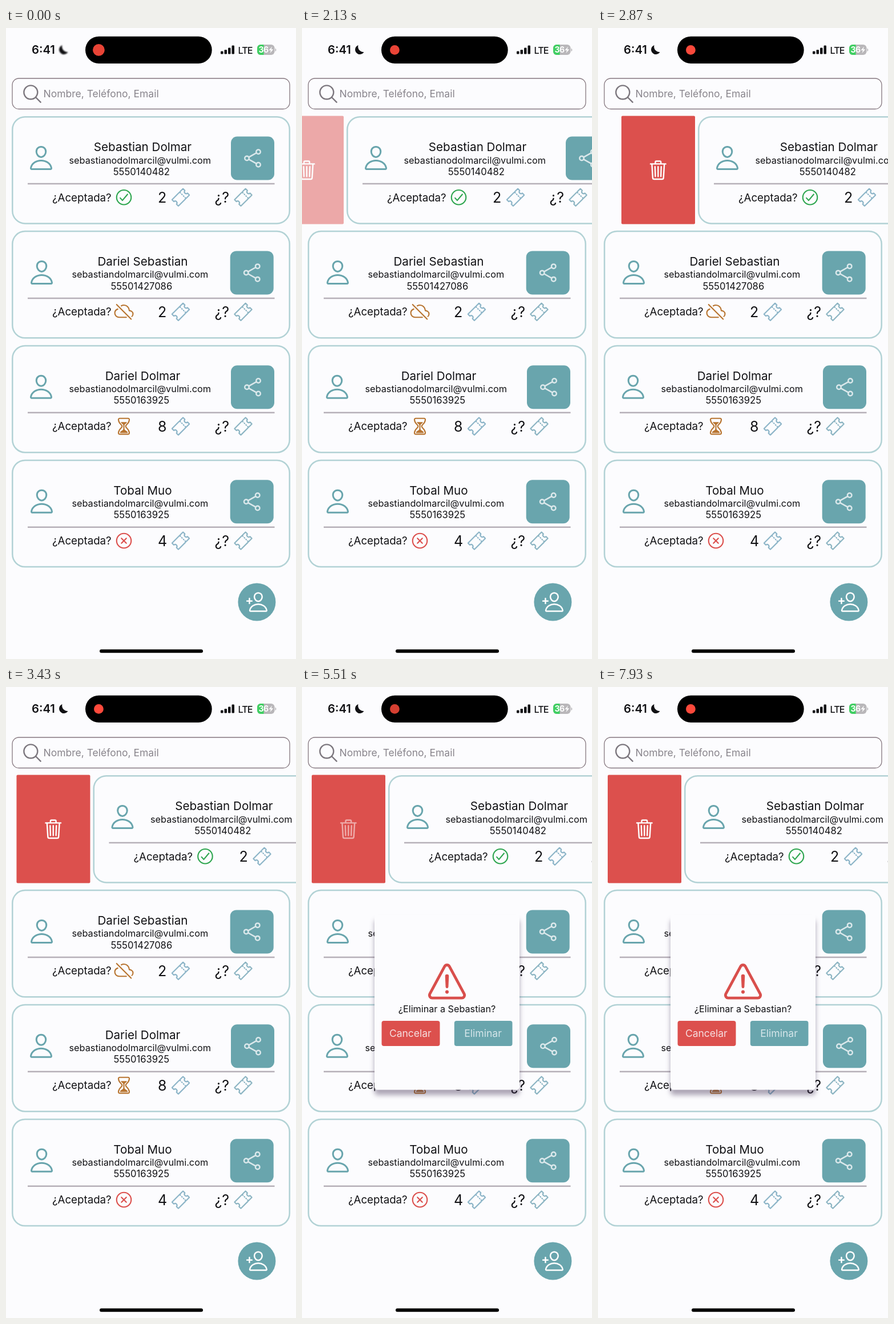
Write an HTML page that moves like this. It is 508 px wide and 1102 px high and loops after 8 s.

```html
<!DOCTYPE html>
<html lang="es">
<head>
<meta charset="utf-8">
<title>Invitados</title>
<style>
  html, body { margin: 0; width: 100%; height: 100%; overflow: hidden; background: #fcfcfe; }
  svg { display: block; width: 100%; height: 100%; }
  text { font-family: Inter, "Noto Sans", sans-serif; fill: #111114; }
  .icon { fill: none; stroke: currentColor; stroke-width: 32; stroke-linecap: round; stroke-linejoin: round; }
  .icon .solid { fill: currentColor; stroke: none; }
  #dialog > rect:first-child { filter: drop-shadow(0 9px 4px rgba(62, 45, 80, .42)); }
</style>
</head>
<body>
<svg id="stage" viewBox="0 0 508 1102"></svg>
<script>
const LOOP = 8000;
const TEAL = '#69a5ad', RED = '#dc504d', AMBER = '#b87531', GREEN = '#2fa650', PAPER = '#fcfcfe';

// Icon outlines on a 512 unit grid
const path = (d, cls = '') => `<path class="${cls}" d="${d}"/>`;
const ring = (x, y, r) => `<circle cx="${x}" cy="${y}" r="${r}"/>`;
const person = path('M344 144c-3.92 52.87-44 96-88 96s-84.15-43.12-88-96c-4-55 35-96 88-96s92 42 88 96z' +
  'M256 304c-87 0-175.3 48-191.64 138.6C62.39 453.52 68.57 464 80 464h352c11.44 0 17.62-10.48 15.65-21.4C431.3 352 343 304 256 304z');
const icons = {
  person,
  addPerson: `<g transform="translate(32)">${person}</g>` + path('M88 176v112M144 232H32'),
  search: ring(221, 221, 157) + path('M338 338L448 448'),
  share: ring(128, 256, 48) + ring(384, 112, 48) + ring(384, 400, 48) +
    path('M169.8 279.5l172.4 97M342.2 135.5l-172.4 97'),
  check: ring(256, 256, 192) + path('M352 176L217.6 336 160 272'),
  cross: ring(256, 256, 192) + path('M320 320L192 192M192 320l128-128'),
  offline: path('M448 448L64 64M93.7 183.3C49.5 198 16 233 16 288c0 66 54 112 120 112h184.4' +
    'M467.8 377.2C485.2 363.4 496 341.6 496 312c0-59.8-53-85.8-96-88-8.9-89.5-71-144-144-144-26.2 0-48.8 6.9-67.6 18.1'),
  hourglass: path('M145.6 464h220.8c19.8 0 35.5-16.3 33.4-35C386 308 304 310 304 256s83-51 95.8-173c2-18.7-13.6-35-33.4-35H145.6' +
    'c-19.8 0-35.4 16.3-33.4 35C125 205 208 201 208 256s-82 52-95.8 173c-2.1 18.7 13.6 35 33.4 35z') +
    path('M343 432H169c-15.6 0-20-18-9-29 26.5-27 80-46 80-77V224c0-20-38-35-61.5-67-4-5.5-3.5-13 6.5-13h142.6' +
    'c8.4 0 10.2 7.5 6.4 13C311 189 272 204 272 224v102c0 30.5 55.7 47 80.4 77 10 12 6.5 29-9.4 29z', 'solid'),
  ticket: path('M366 146a46.7 46.7 0 01-2.4-63.4 4 4 0 00-.2-5.3l-44.1-44.2a4 4 0 00-5.5 0l-70.3 70.4a23.6 23.6 0 00-5.7 9.2' +
    ' 23.7 23.7 0 01-15 15 23.7 23.7 0 00-9.2 5.7L33 313.8a4 4 0 000 5.5l44.1 44.1a4 4 0 005.3.2 46.7 46.7 0 0165.9 65.9' +
    ' 4 4 0 00.2 5.3l44.1 44.1a4 4 0 005.5 0l180.4-180.4a23.7 23.7 0 005.7-9.2 23.7 23.7 0 0115-15 23.6 23.6 0 009.2-5.7' +
    'l70.4-70.4a4 4 0 000-5.5l-44.1-44.1a4 4 0 00-5.3-.2A46.7 46.7 0 01366 146z') +
    path('M250.5 140.4l-16.5-16.5M294.5 184.5l-11-11M338.5 228.5l-11-11M388 278l-16.5-16.5'),
  trash: path('M112 112l20 320c1 18.5 14.4 32 32 32h184c17.7 0 30.9-13.5 32-32l20-320M80 112h352' +
    'M192 112V72a24 24 0 0124-24h80a24 24 0 0124 24v40M256 176v224M184 176l8 224M328 176l-8 224'),
  warning: path('M85.6 446h340.8a32 32 0 0028.2-47L284.2 82.6c-12-22.4-44.3-22.4-56.4 0L57.4 399a32 32 0 0028.2 47z' +
    'M250.3 195.4l5.7 122 5.7-122a5.7 5.7 0 00-11.4 0z') + `<circle class="solid" cx="256" cy="377" r="20"/>`
};

const icon = (name, x, y, size, color) =>
  `<g class="icon" color="${color}" transform="translate(${x} ${y}) scale(${size / 512}) translate(-256 -256)">${icons[name]}</g>`;
const text = (s, x, y, size, attrs = '') => `<text x="${x}" y="${y}" font-size="${size}" ${attrs}>${s}</text>`;
const centered = (s, x, y, size, attrs = '') => text(s, x, y, size, `text-anchor="middle" ${attrs}`);
const box = (x, y, w, h, r, attrs) => `<rect x="${x}" y="${y}" width="${w}" height="${h}" rx="${r}" ${attrs}/>`;

const guests = [
  { name: 'Sebastian Dolmar', email: 'sebastianodolmarcil@vulmi.com', phone: '5550140482', tickets: 2, status: 'check', color: GREEN },
  { name: 'Dariel Sebastian', email: 'sebastiandolmarcil@vulmi.com', phone: '55501427086', tickets: 2, status: 'offline', color: AMBER },
  { name: 'Dariel Dolmar', email: 'sebastianodolmarcil@vulmi.com', phone: '5550163925', tickets: 8, status: 'hourglass', color: AMBER },
  { name: 'Tobal Muo', email: 'sebastiandolmarcil@vulmi.com', phone: '5550163925', tickets: 4, status: 'cross', color: RED }
];

// Card content relative to the top of its row
function card(guest, row) {
  const nudge = row % 2;
  return `<g transform="translate(0 ${154 + row * 199.9})"><g id="card${row}">
    ${box(11.3, 1.2, 485.4, 186.2, 22, `fill="${PAPER}" stroke="#b2d2d5" stroke-width="2.5"`)}
    ${icon('person', 61.5 + nudge, 73, 48, TEAL)}
    ${centered(guest.name, 239.5, 61.3, 20.6)}
    ${centered(guest.email, 234.8, 82.5, 16.3)}
    ${centered(guest.phone, 237.3, 102.7, 16.6)}
    ${box(394 - nudge * 1.3, 35.5, 76, 76, 11, `fill="${TEAL}"`)}
    ${icon('share', 432 - nudge * 1.3, 73.5, 40, '#dbe8eb')}
    <path d="M38 118H470.5" stroke="#b6b0b8" stroke-width="2.5"/>
    ${text('¿Aceptada?', 81, 148.5, 18.7)}
    ${icon(guest.status, 206.5, 141.8, 34, guest.color)}
    ${text(guest.tickets, 266, 151, 25)}
    ${icon('ticket', 306, 141.8, 34.5, '#8db5c8')}
    ${text('¿?', 365.5, 151, 25)}
    ${icon('ticket', 415.5, 141.8, 34.5, '#8db5c3')}
  </g></g>`;
}

const statusBar = `
  ${text('6:41', 45, 45.2, 20.3, 'font-weight="600"')}
  <path id="moon" d="M98.5 30A8.3 8.3 0 1 0 108.5 42A9.5 9.5 0 0 1 98.5 30Z" fill="#111114"/>
  ${box(139, 14.7, 221.7, 47.3, 23.6, 'fill="#000"')}
  <circle id="recording" cx="162.4" cy="38.4"/>
  ${[5, 7.5, 11, 15].map((h, i) => box(376 + i * 6.5, 45.5 - h, 4.5, h, 1.2, 'fill="#111114"')).join('')}
  ${text('LTE', 406.5, 44.5, 16.2, 'font-weight="500" letter-spacing="-1"')}
  <clipPath id="cell">${box(440, 29, 30.5, 18, 6, '')}</clipPath>
  <g clip-path="url(#cell)">${box(440, 29, 31, 18, 0, 'fill="#b9b7ba"')}${box(440, 29, 11.5, 18, 0, 'fill="#40cf62"')}</g>
  <path d="M471.5 35.5a3 3 0 0 1 0 5.5z" fill="#b9b7ba"/>
  ${text('36', 442.5, 43.2, 14, 'font-weight="700" letter-spacing="-.6" style="fill:#fff"')}
  <path d="M466 32.5l-5.5 6.5h3.5l-1.5 5 5.7-6.7h-3.6z" fill="#fff"/>`;

const searchBox = `
  ${box(11, 88, 486, 53.5, 11.5, 'fill="none" stroke="#85777f" stroke-width="1.3"')}
  ${icon('search', 46, 115, 39, '#7c777e')}
  ${text('Nombre, Teléfono, Email', 65.5, 121.2, 17.5, 'style="fill:#88848b"')}`;

const deleteAction = `<g id="delete">
  ${box(-124, 153.5, 129, 189, 2, `fill="${RED}"`)}
  <g id="trash">${icon('trash', -59.7, 248.3, 38.8, '#fff')}</g></g>`;

const dialog = `<g id="dialog">
  ${box(127, 398, 254, 305.5, 5, `fill="${PAPER}"`)}
  ${icon('warning', 254, 514.3, 77.5, '#d94f4c')}
  ${centered('¿Eliminar a Sebastian?', 254, 568, 16.2)}
  ${box(139.5, 583, 102, 44, 4, `fill="${RED}"`)}
  ${centered('Cancelar', 189.8, 611, 17.5, 'style="fill:#f6dfe0"')}
  ${box(266.8, 583, 101.7, 44, 4, `fill="${TEAL}"`)}
  ${centered('Eliminar', 317, 611, 17.6, 'style="fill:#d6e6ea"')}</g>`;

document.getElementById('stage').innerHTML = statusBar + searchBox + deleteAction +
  guests.map(card).join('') + `
  <circle cx="439.4" cy="1002.5" r="33" fill="${TEAL}"/>
  ${icon('addPerson', 439.4, 1002.5, 39.5, '#fff')}
  ${box(164, 1085.2, 181, 6, 3, 'fill="#000"')}` + dialog;

const $ = id => document.getElementById(id);
const progress = (t, start, end) => Math.min(1, Math.max(0, (t - start) / (end - start)));
const REST = 141, PULLED = 165, RELEASE = 3150, OPEN = 5410;

function swipeOffset(t) {
  if (t < RELEASE) return PULLED * Math.sin(progress(t, 1857, 2870) * Math.PI / 2);
  return REST + (PULLED - REST) * Math.exp((RELEASE - t) / 100);
}

function render(t) {
  const x = swipeOffset(t);
  $('card0').setAttribute('transform', `translate(${x})`);
  $('delete').setAttribute('transform', `translate(${x})`);
  $('delete').setAttribute('opacity', Math.min(1, x / REST));

  const pressed = progress(t, 5210, 5360) - progress(t, OPEN, OPEN + 250);
  $('trash').setAttribute('opacity', 1 - 0.8 * pressed);
  $('dialog').setAttribute('visibility', t >= OPEN ? 'visible' : 'hidden');

  // The status indicators shrink and sharpen into place, then the dot pulses
  const unsettled = 1 - progress(t, 0, 400);
  const glow = Math.abs(Math.sin((t - 1480) / 4000 * Math.PI)) * (1 - unsettled / 2);
  $('recording').setAttribute('r', 8.4 + 2 * unsettled);
  $('recording').setAttribute('fill', `rgb(${212 + 43 * glow} ${63 + 11 * glow} ${49 + 11 * glow})`);
  $('moon').style.filter = unsettled ? `blur(${1.2 * unsettled}px)` : 'none';
}

function tick() {
  render(performance.now() % LOOP);
  requestAnimationFrame(tick);
}
tick();
</script>
</body>
</html>
```
